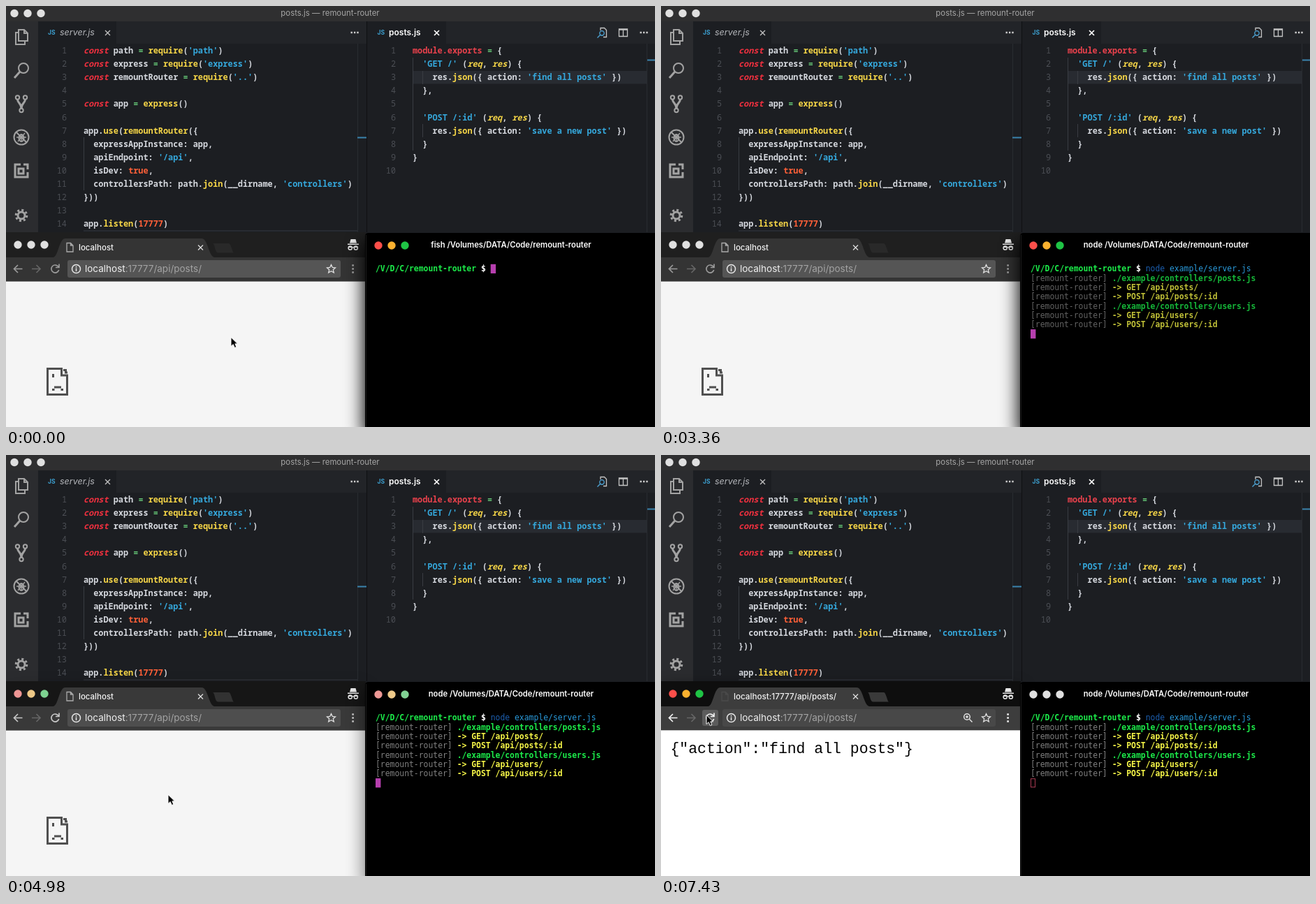
Write an HTML page that moves like this. It is 929x603 px and loops after 8 s.

```html
<!DOCTYPE html>
<html lang="en">
<head>
<meta charset="utf-8">
<title>remount-router demo</title>
<style>
html, body { margin: 0; width: 100%; height: 100%; overflow: hidden; background: #000; }
svg { display: block; width: 100vw; height: 100vh; }
text { white-space: pre; font: 12px Inter, sans-serif; }
.code text { font: 600 11.88px "Noto Sans Mono", monospace; fill: #d5d8de; }
.code .num { fill: #4b4e54; text-anchor: end; font-weight: 400; }
.key { fill: #f0303f; font-style: italic; font-weight: 700; }
.mod { fill: #e8414c; }
.fn { fill: #f5d547; }
.arg { fill: #f5d547; font-style: italic; }
.str { fill: #35a8dc; }
.lit { fill: #ff6038; }
.op { fill: #62c073; }
.term text { font: 11.4px "DejaVu Sans Mono", monospace; }
.term .b { font-weight: 700; }
.line { fill: none; stroke: #a3a3a3; stroke-width: 2; }
.thin { fill: none; stroke: #c4c4c4; stroke-width: 1.3; }
.nav { fill: none; stroke: #9a9a9a; stroke-width: 1.7; }
.body { font: 21.45px "Liberation Mono", monospace; }
</style>
</head>
<body>
<svg viewBox="0 0 929 603" preserveAspectRatio="none">
  <defs>
    <filter id="blur" x="-30%" y="-30%" width="160%" height="160%"><feGaussianBlur stdDeviation="13"/></filter>
    <clipPath id="browserClip"><rect y="324" width="514.5" height="279"/></clipPath>
  </defs>

  <!-- editor -->
  <rect width="929" height="326" fill="#1c1e22"/>
  <rect width="929" height="22" fill="#2f2f30"/>
  <g id="editorLights"></g>
  <text x="464" y="14.3" text-anchor="middle" style="font-size:11.4px" fill="#a5a5a5">posts.js — remount-router</text>
  <rect y="22" width="46" height="302" fill="#2b2c2f"/>
  <path d="M158 22H516V54H158ZM630 22H929V54H630Z" fill="#222428"/>
  <path d="M516.5 22V324" stroke="#0f1012"/>
  <path d="M503.5 54V324M917.5 54V324" stroke="#292c31"/>
  <path d="M503 188.5H516M918 77.5H929" stroke="#3a83ad" stroke-width="2"/>
  <rect x="582" y="93" width="335" height="18.5" fill="#282b31"/>
  <rect x="111" y="321" width="392" height="2" fill="#282b31"/>
  <path d="M111.5 188V264M582.5 74V207M596.5 93V112M596.5 169V188" stroke="#393c42"/>
  <g class="line">
    <path d="M18 34H26L31 39V50H18ZM26 34V39H31M18 38H14V55H27V50"/>
    <circle cx="25" cy="89" r="7"/><path d="M20 94L12 103" stroke-width="3"/>
    <circle cx="16.5" cy="131" r="2.7"/><circle cx="27.5" cy="131" r="2.7"/><circle cx="22" cy="149.5" r="2.7"/>
    <path d="M16.5 134C17 140 22 139 22 147M27.5 134C27 140 22 139 22 147" stroke-width="3"/>
    <circle cx="22" cy="188" r="10.5"/><path d="M15 181L29 195"/>
    <ellipse cx="22" cy="189" rx="3.5" ry="5"/><path d="M15 188H29M17 194L27 182M22 184V194" stroke-width="1.4"/>
    <path d="M21 227H13V245H31V238M18 233H25V240H18ZM25 227H31V234" stroke-width="3"/>
    <circle cx="22" cy="300" r="5" stroke-width="3"/>
    <circle cx="22" cy="300" r="7.8" stroke-width="3" stroke-dasharray="3 3.126"/>
  </g>
  <g fill="#3c9fcf">
    <text x="60" y="41" style="font-size:8.5px;font-weight:700">JS</text>
    <text x="531.5" y="41" style="font-size:8.5px;font-weight:700">JS</text>
  </g>
  <text x="77" y="42" fill="#b4b6ba" style="font-size:12.5px;font-style:italic">server.js</text>
  <text x="548" y="42" fill="#fff" style="font-weight:600">posts.js</text>
  <path class="thin" d="M142 35L149 42M149 35L142 42"/>
  <path class="thin" d="M613 35L620 42M620 35L613 42" style="stroke:#fff;stroke-width:1.7"/>
  <path d="M493.5 38h2.4m2 0h2.4m2 0h2.4M907.5 38h2.4m2 0h2.4m2 0h2.4" stroke="#ccc" stroke-width="2.4"/>
  <path class="thin" d="M877.5 33H889.5V43.5H877.5ZM883.5 33V43.5M877 34H890"/>
  <path class="thin" d="M851 35V31.5H856.5L859.5 34.5V44.5H855"/>
  <path d="M850.5 41.5L846.5 45.5M850.8 41.2A3.2 3.2 0 1 1 855.2 41.2A3.2 3.2 0 0 1 850.8 41.2" fill="none" stroke="#4da3d4" stroke-width="1.3"/>
  <g class="code" id="code"></g>

  <!-- browser -->
  <rect id="browserShadow" y="336" width="514" height="280" filter="url(#blur)" opacity="0"/>
  <g clip-path="url(#browserClip)">
    <rect class="strip" y="324" width="515" height="37" fill="#1f1f1f"/>
    <path class="bar" d="M0 360H68C75 358 76 333 85 333H280C289 333 290 358 298 360H515V394.5H0Z" fill="#343434"/>
    <path class="plus" d="M296 340H319C322 340 324 353 326 353.5H303C299 353 299 341 296 340Z" fill="#292929"/>
    <g id="browserLights"></g>
    <path id="pageIcon" class="thin" d="M87 339.5H92.5L96 343V352H87ZM92.5 339.5V343H96" style="stroke:#aaa"/>
    <g fill="#f2f2f2">
      <text id="shortTitle" x="104" y="349.6" style="font-size:11.5px;font-weight:500">localhost</text>
      <text id="longTitle" x="104" y="349.6" style="font-size:11.7px;font-weight:500">localhost:17777/api/posts/</text>
    </g>
    <path class="thin" d="M275 342.5L282 349.5M282 342.5L275 349.5" style="stroke:#ddd"/>
    <g fill="#e8e8e8">
      <path d="M489 340.5H505V342H489ZM492 339.5L493.5 334H500.5L502 339.5Z"/>
      <path d="M490 345.5H504" stroke="#e8e8e8"/>
      <g fill="none" stroke="#e8e8e8" stroke-width="1.5"><circle cx="492.7" cy="346.5" r="2.6"/><circle cx="500.8" cy="346.5" r="2.6"/></g>
    </g>
    <rect id="hover" x="59" y="365" width="23" height="23" rx="3" fill="#5c5c5c"/>
    <path class="nav" d="M23.5 376.5H11.5M17 371L11.5 376.5L17 382"/>
    <path class="nav" d="M37 376.5H49M43.5 371L49 376.5L43.5 382" style="stroke:#666"/>
    <g id="reload"><path class="nav" d="M75 373.5A5.5 5.5 0 1 0 75.7 378M76 369.5V374.5H71"/></g>
    <path id="stop" d="M65 371.5L75 381.5M75 371.5L65 381.5" stroke="#858585" stroke-width="1.8"/>
    <rect class="pill" x="88" y="364" width="391" height="25" rx="3" fill="#555"/>
    <g fill="none" stroke="#e8e8e8" stroke-width="1.5"><circle cx="100.5" cy="376.5" r="6"/><path d="M100.5 375.5V380M100.5 372.8V374.4"/></g>
    <text x="113" y="381.2" style="font-size:13.5px" fill="#f0f0f0">localhost<tspan fill="#a3a3a3">:17777/api/posts/</tspan></text>
    <g id="zoom" fill="none" stroke="#e0e0e0" stroke-width="1.5"><circle cx="438" cy="375" r="4.3"/><path d="M441.3 378.3L445.5 382.5M436 375H440M438 373V377"/></g>
    <path d="M465.5 370.5L467.3 374.5L471.5 375L468.3 377.8L469.3 382L465.5 379.7L461.7 382L462.7 377.8L459.5 375L463.7 374.5Z" fill="none" stroke="#e0e0e0" stroke-width="1.3"/>
    <path class="dots" d="M495.3 371.5h2.6m-2.6 5h2.6m-2.6 5h2.6" stroke="#a5a5a5" stroke-width="2.6"/>
    <rect y="394.5" width="515" height="209" fill="#f5f5f5"/>
    <g id="sad" fill="none" stroke="#505050" stroke-width="3">
      <path d="M81 519.5H59.5V556.5H87.5V528"/>
      <path d="M79.5 519V529H89M82 521.5H85.5V525H88"/>
      <path d="M67.5 527V532M66 549.5H69.5M69 546H79M78.5 549.5H82"/>
    </g>
    <g id="page">
      <rect y="394.5" width="515" height="209" fill="#fff"/>
      <text id="result" class="body" x="13.5" y="427">{"action":"find all posts"}</text>
    </g>
    <rect id="termShadow" x="512" y="338" width="417" height="280" filter="url(#blur)"/>
  </g>

  <!-- terminal -->
  <path d="M514 603V330Q514 325 519 325H929V603Z"/>
  <path d="M515.5 603V328" stroke="#1c1c1c"/>
  <g id="termLights"></g>
  <g fill="#fff">
    <text id="fishTitle" x="723" y="345.8" text-anchor="middle" style="font-size:11.25px;font-weight:600">fish /Volumes/DATA/Code/remount-router</text>
    <text id="nodeTitle" x="723" y="345.8" text-anchor="middle" style="font-size:11.25px;font-weight:600">node /Volumes/DATA/Code/remount-router</text>
  </g>
  <g class="term" id="term"></g>

  <path id="pointer" d="M0 0V13L3.2 10.2L5.4 15L7.9 14L5.8 9.3H9.7Z" fill="#000" stroke="#fff"/>
</svg>

<script>
const LOOP = 8000, FOCUS = [4910, 5050], REPLY = 6110;
const byId = id => document.getElementById(id);
const add = (parent, markup) => {
  parent.insertAdjacentHTML('beforeend', markup);
  return parent.lastElementChild;
};

// frames: [time, styles, easing]
const animate = (el, frames) => el.animate(
  frames.map(([time, styles, easing = 'linear']) => ({ ...styles, offset: time / LOOP, easing })),
  { duration: LOOP, iterations: Infinity });

// hard changes of opacity: [time, opacity], starting at 0
const cut = (el, steps) => animate(el,
  [...steps, [LOOP, steps.at(-1)[1]]].map(([time, opacity]) => [time, { opacity }, 'step-end']));

function show(el, from, to = LOOP) {
  const steps = [[0, from ? 0 : 1]];
  if (from) steps.push([from, 1]);
  if (to < LOOP) steps.push([to, 0]);
  cut(el, steps);
}

const onFocus = (el, prop, before, after) => animate(el, [
  [0, { [prop]: before }], [FOCUS[0], { [prop]: before }],
  [FOCUS[1], { [prop]: after }], [LOOP, { [prop]: after }]]);

// window buttons
const COLORS = ['#fc4f4a', '#fbb12f', '#1fc445'], PALE = '#e0e0e0';
const lights = (id, x, y, recolor) => COLORS.forEach((color, i) => {
  const dot = add(byId(id), `<circle cx="${x + 19 * i}" cy="${y}" r="5.7" fill="${PALE}"/>`);
  if (recolor) onFocus(dot, 'fill', ...recolor(color));
});
lights('editorLights', 12, 10.5);
lights('browserLights', 17, 342, color => [PALE, color]);
lights('termLights', 533, 343, color => [color, PALE]);

// source code
const RULES = [
  ['str', /'[^']*'/], ['key', /\bconst\b/], ['mod', /module\.exports/],
  ['lit', /\btrue\b|\d+/], ['arg', /\bre[qs]\b(?=[,)])/], ['fn', /\w+(?=\()/], ['op', /=/]];
const TOKEN = new RegExp(RULES.map(([, rule]) => `(${rule.source})`).join('|'), 'g');
const highlight = line => line.replace(TOKEN, (word, ...groups) =>
  `<tspan class="${RULES[groups.findIndex(Boolean)][0]}">${word}</tspan>`);

function listing(x, numberX, source) {
  source.split('\n').forEach((line, i) => {
    const y = 68.2 + 19.07 * i, indent = line.search(/\S|$/);
    add(byId('code'), `<text class="num" x="${numberX}" y="${y}">${i + 1}</text>`);
    add(byId('code'), `<text x="${x + indent * 7.13}" y="${y}">${highlight(line.trim())}</text>`);
  });
}
listing(111, 87, `const path = require('path')
const express = require('express')
const remountRouter = require('..')

const app = express()

app.use(remountRouter({
  expressAppInstance: app,
  apiEndpoint: '/api',
  isDev: true,
  controllersPath: path.join(__dirname, 'controllers')
}))

app.listen(17777)`);
listing(582, 558, `module.exports = {
  'GET /' (req, res) {
    res.json({ action: 'find all posts' })
  },

  'POST /:id' (req, res) {
    res.json({ action: 'save a new post' })
  }
}
`);

// terminal
const term = byId('term');
const col = n => 529 + 6.863 * n;
const row = n => 380.4 + 13.33 * n;
const print = (c, r, fill, text, cls = '') =>
  `<text class="${cls}" x="${col(c)}" y="${row(r)}" fill="${fill}">${text}</text>`;
const block = (c, r) => `<rect x="${col(c)}" y="${row(r) - 10.6}" width="7.4" height="13.2" fill="#b63fae"/>`;

add(term, print(0, 0, '#1cec4a', '/V/D/C/remount-router', 'b'));
add(term, print(22, 0, '#fff', '$', 'b'));

const COMMAND = 'node example/server.js', ENTER = 2360;
// [time, characters typed]
const KEYS = [[0, 0], [500, 1], [700, 2], [770, 3], [840, 4], [1120, 5], [1430, 6], [1840, 22], [ENTER, 22]];
KEYS.forEach(([time, typed], i) => {
  const entered = time === ENTER, done = typed === COMMAND.length;
  const parts = [
    entered ? '' : block(24 + typed + (done ? 1 : 0), 0),
    print(24, 0, '#1c5fb0', COMMAND.slice(0, Math.min(typed, 4))),
    typed > 5 ? print(29, 0, '#2a9bdc', COMMAND.slice(5, typed)) : '',
    typed ? print(24 + typed, 0, '#606060', COMMAND.slice(typed)) : ''];
  show(add(term, `<g>${parts.join('')}</g>`), time, entered ? LOOP : KEYS[i + 1][0]);
});
show(add(term, block(0, 1)), 2460, 3360);

const OUTPUT = ['posts', 'users'].flatMap(name => [
  ['#1cec4a', `./example/controllers/${name}.js`],
  ['#f7f748', `-> GET /api/${name}/`],
  ['#f7f748', `-> POST /api/${name}/:id`]]);
const output = add(term, `<g>${OUTPUT.map(([color, text], i) =>
  print(0, i + 1, '#808080', '[remount-router]') + print(17, i + 1, color, text, 'b')).join('')}</g>`);
cut(output, [[0, 0], [3360, .78], [3390, 1]]);
show(add(term, block(0, 7)), 3360, 5290);
show(add(term, `<rect x="529.5" y="${row(7) - 10}" width="6" height="12" fill="none" stroke="#a83a52"/>`), 5290);
show(byId('fishTitle'), 0, ENTER);
show(byId('nodeTitle'), ENTER);

// focus moves from the terminal to the browser
onFocus(byId('termShadow'), 'opacity', 1, 0);
onFocus(byId('browserShadow'), 'opacity', 0, .7);
[['.strip', 'fill', '#1f1f1f', '#0e0e0e'], ['.bar', 'fill', '#343434', '#3d3d3d'],
 ['.pill', 'fill', '#555555', '#484848'], ['.plus', 'fill', '#292929', '#3a3a3a'],
 ['.nav:not([style])', 'stroke', '#9a9a9a', '#f0f0f0'], ['.dots', 'stroke', '#a5a5a5', '#f0f0f0']]
  .forEach(([selector, ...change]) =>
    document.querySelectorAll(selector).forEach(el => onFocus(el, ...change)));

// page reload
cut(byId('reload'), [[0, 1], [5980, 0], [7430, 1]]);
show(byId('stop'), 5980, 7430);
show(byId('hover'), 7430);
show(byId('sad'), 0, 6050);
show(byId('page'), 6050);
['result', 'longTitle', 'zoom'].forEach(id => show(byId(id), REPLY));
show(byId('shortTitle'), 0, REPLY);
cut(byId('pageIcon'), [[0, 1], [REPLY, .12]]);

// mouse pointer
const at = (x, y, opacity = 1) => ({ transform: `translate(${x}px, ${y}px)`, opacity });
animate(byId('pointer'), [
  [0, at(322, 474.5), 'step-end'],
  [500, at(322, 474.5, 0), 'step-end'],
  [4430, at(308, 480), 'ease-out'],
  [4700, at(232, 486.5)],
  [5290, at(232, 486.5), 'ease-in-out'],
  [5500, at(88, 393), 'ease-out'],
  [5810, at(65, 372.5)],
  [LOOP, at(65, 372.5)]]);
</script>
</body>
</html>
```
